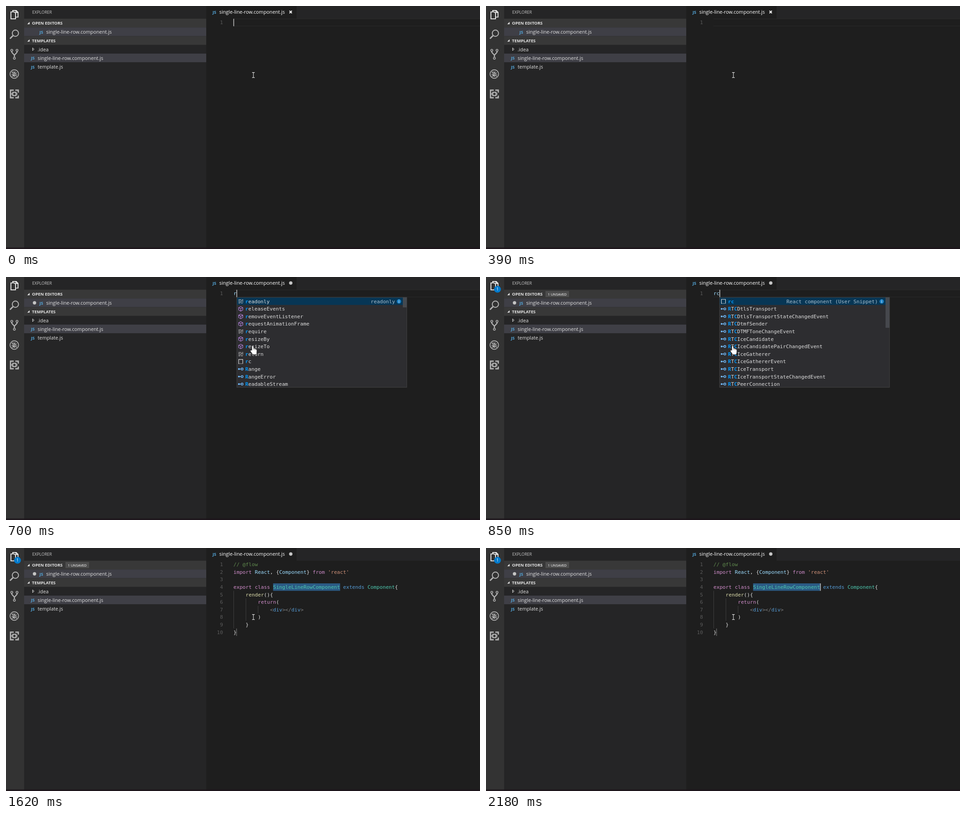
An HTML page for the animation above (2490 ms loop, 1044x536 px).

```html
<!DOCTYPE html>
<html lang="en">
<head>
<meta charset="utf-8">
<title>Snippet completion</title>
<style>
html, body { margin: 0; width: 100%; height: 100%; overflow: hidden; background: #1e1e1e; }
svg { display: block; width: 1044px; height: 536px; }
text { white-space: pre; }
.code { font: 11.15px "DejaVu Sans Mono", monospace; }
.ui { font: 10.8px "Open Sans", sans-serif; }
.label { font: 9px "Open Sans", sans-serif; }
.head { font: bold 9.3px "Open Sans", sans-serif; }
.small { font: 7.8px "Open Sans", sans-serif; }
.badge { font: 9px "Open Sans", sans-serif; }
.js { font: bold 9.2px "Open Sans", sans-serif; }
</style>
</head>
<body>
<svg id="stage" viewBox="0 0 1044 536"></svg>
<script>
const LOOP = 2490;
const LINE = 16.59;
const CHAR = 6.713;
const CODE_X = 501;
const C = {
  text: '#dedede', pink: '#cf8cc9', blue: '#569cd6', sky: '#9cdcfe', teal: '#4ec9b0',
  green: '#608b4e', string: '#ce9178', yellow: '#dcdcaa', dim: '#808080',
  match: '#0097fb', icon: '#b4b4b4', ui: '#e2e2e2', js: '#55a8dc'
};
const stage = document.getElementById('stage');

function add(parent, tag, attrs = {}, content = '') {
  const el = document.createElementNS('http://www.w3.org/2000/svg', tag);
  for (const key in attrs) el.setAttribute(key, attrs[key]);
  el.textContent = content;
  return parent.appendChild(el);
}
const group = (parent = stage, attrs) => add(parent, 'g', attrs);
const rect = (p, x, y, width, height, fill, extra) => add(p, 'rect', { x, y, width, height, fill, ...extra });
const circle = (p, cx, cy, r, fill, extra) => add(p, 'circle', { cx, cy, r, fill, ...extra });
const stroke = (p, d, color, width = 1, fill = 'none') =>
  add(p, 'path', { d, stroke: color, 'stroke-width': width, fill });
const label = (p, cls, x, y, fill, str, extra) => add(p, 'text', { class: cls, x, y, fill, ...extra }, str);

// Tokens are [color, string, weight] entries laid out on the monospace grid.
function codeText(p, x, y, tokens) {
  const el = add(p, 'text', { class: 'code', x, y });
  for (const [fill, str, weight = 400] of tokens) add(el, 'tspan', { fill, 'font-weight': weight }, str);
}

function activityBar(p) {
  rect(p, 0, 0, 40, 536, '#333333');
  stroke(p, 'M14.8 12.5V9.8H22.5L26.5 13.8V24.5H21.5M22 10V14.3H26.5', '#fff', 1.7);
  stroke(p, 'M10.8 13H18.2L21 16V28.3H10.8Z', '#fff', 1.7);

  circle(p, 20.7, 60, 6.9, 'none', { stroke: C.icon, 'stroke-width': 2 });
  stroke(p, 'M15.5 65.3L8.8 72', C.icon, 3);

  stroke(p, 'M12.7 99V102L18.5 108.5V114M24.3 99V102L18.5 108.5', C.icon, 2.2);
  for (const [x, y] of [[12.7, 97.8], [24.3, 97.8], [18.5, 115.3]])
    circle(p, x, y, 2.2, '#333333', { stroke: C.icon, 'stroke-width': 1.5 });

  circle(p, 18.3, 150, 9.4, 'none', { stroke: C.icon, 'stroke-width': 1.7 });
  add(p, 'ellipse', { cx: 18.3, cy: 151, rx: 3.2, ry: 4.8, fill: C.icon });
  stroke(p, 'M12.5 147L15.5 149M12 151.5H24.5M13 156L16 153.5M24 147L21 149M23.5 156L20.5 153.5M16 144.5L18.3 147L20.6 144.5', C.icon, 1.3);
  stroke(p, 'M11.8 143.5L24.8 156.5', '#333333', 3);
  stroke(p, 'M11.8 143.5L24.8 156.5', C.icon, 1.5);

  stroke(p, 'M17 185.6H10V202.4H17M20.5 202.4H27V197.5M27 191V185.6H20.5', C.icon, 2.8);
  rect(p, 14.9, 190.4, 7.2, 7.2, 'none', { stroke: C.icon, 'stroke-width': 2.4 });
  stroke(p, 'M10 194H15M22 194H25.5', C.icon, 2.6);
}

function fileRow(p, x, y, name, color = C.ui) {
  label(p, 'js', x, y - .5, C.js, 'JS');
  label(p, 'ui', x + 14.8, y, color, name);
}

function sectionHead(p, y, name) {
  rect(p, 40, y, 401, 19.3, '#383838');
  add(p, 'path', { d: `M52 ${y + 7}v5.2h-5.2z`, fill: C.ui });
  label(p, 'head', 57.3, y + 13.2, C.ui, name);
}

function sidebar(p) {
  rect(p, 40, 0, 401, 536, '#252526');
  label(p, 'label', 57.8, 17.3, '#cccccc', 'EXPLORER');
  sectionHead(p, 28, 'OPEN EDITORS');
  rect(p, 40, 47.3, 401, 19, '#3f3f46');
  fileRow(p, 73.7, 61, 'single-line-row.component.js');
  sectionHead(p, 66.4, 'TEMPLATES');
  stroke(p, 'M58.5 92.3L62 95.3L58.5 98.3Z', C.ui, 1);
  label(p, 'ui', 69.5, 99.6, C.ui, '.idea');
  rect(p, 40, 105, 401, 19, '#3f3f46');
  fileRow(p, 55, 118.7, 'single-line-row.component.js');
  fileRow(p, 55, 138, 'template.js');
}

function tabBar(p) {
  rect(p, 441, 0, 603, 28, '#252526');
  rect(p, 441, 0, 199, 28, '#1e1e1e');
  fileRow(p, 455, 17.3, 'single-line-row.component.js', '#ffffff');
}

const lineNumber = (p, n) => label(p, 'code', 478, 40.3 + (n - 1) * LINE, '#5a5a5a', n, { 'text-anchor': 'end' });
const caret = (p, x, y, color = '#c8c8c8') => rect(p, x, y, 1.5, 16.4, color);

function typedLine(p, str) {
  codeText(p, CODE_X, 40.3, [[C.sky, str]]);
}

const itemIcons = {
  keyword(p, x, y) {
    stroke(p, `M${x - 5} ${y - 3.6}h6M${x + 2.5} ${y - 3.6}h3M${x - 5} ${y - 1.2}h3M${x - .5} ${y - 1.2}h6M${x - 5} ${y + 1.4}h7M${x + 3.5} ${y + 1.4}h2M${x - 5} ${y + 4}h4M${x + .5} ${y + 4}h4`, '#c0c0c0', 1.1);
  },
  method(p, x, y) {
    stroke(p, `M${x} ${y - 5}l4.6 2.3v5.2l-4.6 2.5l-4.6 -2.5v-5.2zM${x - 4.6} ${y - 2.7}l4.6 2.4l4.6 -2.4M${x} ${y - .3}v5.2`, '#b180d7', 1.1);
  },
  snippet(p, x, y) {
    stroke(p, `M${x - 4.5} ${y + 5}v-9.5h9v9.5`, C.ui, 1.1);
    stroke(p, `M${x - 4.5} ${y + 4.7}h9`, C.ui, 1.1).setAttribute('stroke-dasharray', '1.5 1.5');
  },
  type(p, x, y) {
    circle(p, x - 4, y, 1.9, '#75beff');
    stroke(p, `M${x - 3} ${y}h4`, '#75beff', 1.2);
    circle(p, x + 3, y, 2.2, 'none', { stroke: '#75beff', 'stroke-width': 1.4 });
  }
};

function popup(p, { x, items, detail, thumb, matched }) {
  rect(p, x, 45, 375, 198.4, '#2d2d30');
  rect(p, x, 45, 375, LINE, '#073655');
  rect(p, x + 366, 45, 9, thumb, '#4a4c50', { opacity: .9 });
  items.forEach(([kind, name], i) => {
    const y = 53.7 + i * LINE;
    itemIcons[kind](p, x + 9, y);
    const tokens = [...name].map((ch, k) => matched(name, k) ? [C.match, ch, 700] : [C.text, ch]);
    codeText(p, x + 19, y + 4, tokens);
  });
  label(p, 'code', x + 349, 57.7, '#a9bfce', detail, { 'text-anchor': 'end' });
  circle(p, x + 357.5, 53.9, 4.8, '#1b80c4');
  stroke(p, `M${x + 357.5} 52.8v4M${x + 357.5} 50.6v1.2`, '#d8ecfa', 1.1);
  rect(p, x + .3, 44.9, 374.5, 198.4, 'none', { stroke: '#454545', 'stroke-width': .9 });
}

const listOf = (kind, names) => names.split(' ').map(name => [kind, name]);
const firstPopup = {
  x: 508, thumb: 22, detail: 'readonly',
  matched: (name, k) => k === 0,
  items: [
    ['keyword', 'readonly'],
    ...listOf('method', 'releaseEvents removeEventListener requestAnimationFrame'),
    ['keyword', 'require'],
    ...listOf('method', 'resizeBy resizeTo'),
    ['keyword', 'return'], ['snippet', 'rc'],
    ...listOf('type', 'Range RangeError ReadableStream')
  ]
};
const secondPopup = {
  x: 514, thumb: 67, detail: 'React component (User Snippet)',
  matched: (name, k) => name === 'rc' || k === 0 || k === 2,
  items: [
    ['snippet', 'rc'],
    ...listOf('type', 'RTCDtlsTransport RTCDtlsTransportStateChangedEvent RTCDtmfSender ' +
      'RTCDTMFToneChangeEvent RTCIceCandidate RTCIceCandidatePairChangedEvent RTCIceGatherer ' +
      'RTCIceGathererEvent RTCIceTransport RTCIceTransportStateChangedEvent RTCPeerConnection')
  ]
};

// Each line: indent in columns, then its tokens.
const program = [
  [0, [C.green, '// @flow']],
  [0, [C.pink, 'import'], [C.sky, ' React'], [C.text, ', {'], [C.sky, 'Component'], [C.text, '} '],
    [C.pink, 'from '], [C.string, "'react'"]],
  [0],
  [0, [C.pink, 'export class '], [C.teal, 'SingleLineRowComponent '], [C.blue, 'extends '],
    [C.teal, 'Component'], [C.text, '{']],
  [4, [C.yellow, 'render'], [C.text, '(){']],
  [8, [C.pink, 'return'], [C.text, '(']],
  [12, [C.dim, '<'], [C.blue, 'div'], [C.dim, '></'], [C.blue, 'div'], [C.dim, '>']],
  [8, [C.text, ')']],
  [4, [C.text, '}']],
  [0, [C.text, '}']]
];

function expandedCode(p) {
  rect(p, CODE_X + 13 * CHAR, 78, 22 * CHAR, 16.4, '#2b5a84');
  for (const [col, from, to] of [[0, 5, 9], [4, 6, 8], [8, 7, 7]])
    rect(p, CODE_X + col * CHAR, 28 + (from - 1) * LINE, 1, (to - from + 1) * LINE, '#404040');
  program.forEach(([indent, ...tokens], i) => {
    if (i) lineNumber(p, i + 1);
    codeText(p, CODE_X + indent * CHAR, 40.3 + i * LINE, tokens);
  });
  rect(p, 507.2, 177.6, 1.2, 16.4, '#777777');
}

function beamPointer(p) {
  const d = 'M542 146.6h2l.9 .8l.9 -.8h2M544.9 147.4v9.6M542 157.9h2l.9 -.8l.9 .8h2';
  stroke(p, d, '#111111', 2.4);
  stroke(p, d, '#f0f0f0', 1.1);
}

function handPointer(p) {
  stroke(p, 'M541.6 162V153.6Q541.6 151.8 543.3 151.8T545 153.6V157.3Q547 156.6 547.5 158.2Q549.3 157.4 549.9 159.2Q552.4 158.8 552.4 161.4V165.2Q552.4 168 550.8 171H543.2Q541.6 167.4 538.8 164.4Q537.8 161.8 539.6 161.2Q540.8 161.2 541.6 162Z',
    '#111111', .6, '#ffffff');
  stroke(p, 'M545 158V161.2M547.5 158.8V161.2M549.9 159.8V161.6', '#444444', .6);
}

activityBar(group());
sidebar(group());
tabBar(group());
lineNumber(stage, 1);

// Layers shown during [from, to) intervals of the loop.
const layers = [];
function layer(draw, ...spans) {
  const g = group();
  draw(g);
  layers.push({ g, spans });
}

layer(g => stroke(g, 'M624.3 10.5L629.7 16M629.7 10.5L624.3 16', '#ffffff', 1.8), [0, 630]);
layer(g => {
  circle(g, 627.2, 13.3, 3.7, '#c5c5c5');
  circle(g, 62.8, 57, 3.7, '#c5c5c5');
}, [630, LOOP]);
layer(g => {
  circle(g, 25.3, 27, 7.6, '#007acc');
  label(g, 'badge', 25.3, 30.4, '#ffffff', '1', { 'text-anchor': 'middle' });
  rect(g, 131, 31, 52, 13.2, '#4d4d4d');
  label(g, 'small', 157, 40.6, '#ffffff', '1 UNSAVED', { 'text-anchor': 'middle' });
}, [850, LOOP]);
layer(g => {
  rect(g, CODE_X, 28, 543, 1, '#2a2a2a');
  rect(g, CODE_X, 43.6, 543, 1, '#2a2a2a');
}, [0, 1160]);
layer(g => caret(g, 500.8, 28.2), [0, 390]);
layer(g => { typedLine(g, 'r'); caret(g, 507.6, 28.2); }, [630, 850]);
layer(g => { typedLine(g, 'rc'); caret(g, 514.2, 28.2); }, [850, 1160]);
layer(g => popup(g, firstPopup), [700, 850]);
layer(g => popup(g, secondPopup), [850, 1160]);
layer(expandedCode, [1160, LOOP]);
layer(g => caret(g, 735.8, 78, '#d9a3cf'), [1160, 1620]);
layer(g => caret(g, 735.8, 78), [2180, LOOP]);
layer(beamPointer, [0, 700], [1160, LOOP]);
layer(handPointer, [700, 1160]);

rect(stage, 0, 532.5, 1044, 3.5, '#1d151b', { opacity: .8 });

const start = performance.now();
function render(now) {
  const t = Math.max(0, now - start) % LOOP;
  for (const { g, spans } of layers)
    g.style.display = spans.some(([from, to]) => t >= from && t < to) ? '' : 'none';
  requestAnimationFrame(render);
}
render(start);
</script>
</body>
</html>
```
